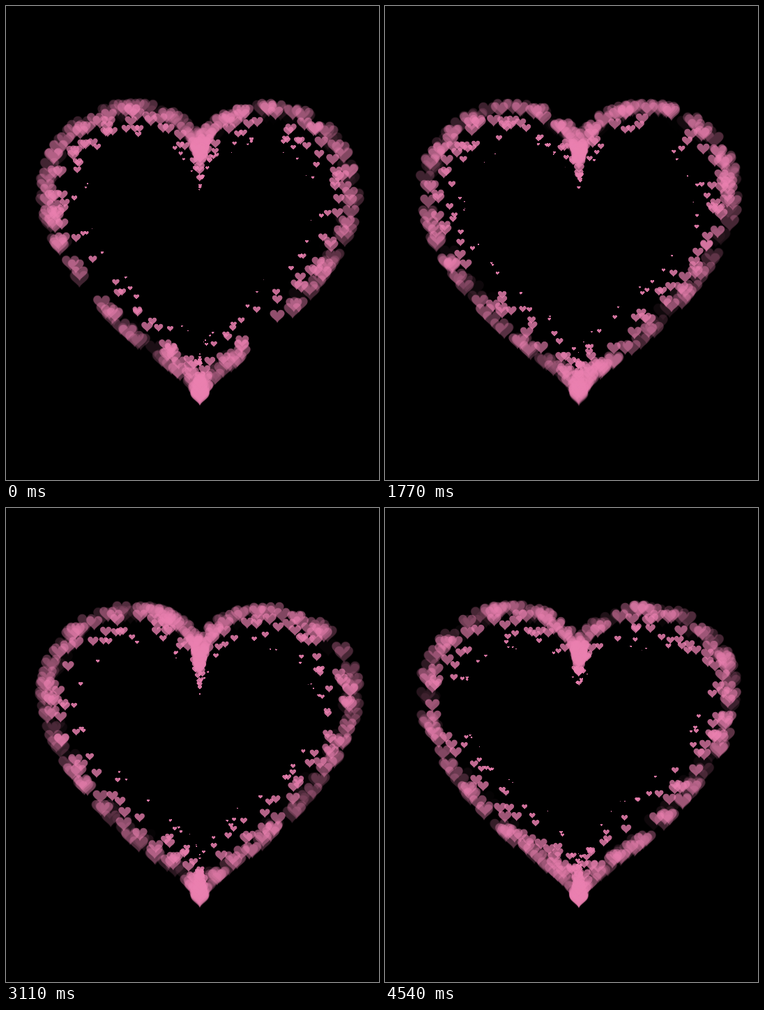
Animation of 535 by 678 pixels, one loop 4.56 s. Source, as an HTML page with a canvas:

```html
<!DOCTYPE html>
<html lang="en">
<head>
<meta charset="utf-8">
<title>Heart of hearts</title>
<style>
html, body { margin: 0; width: 100%; height: 100%; overflow: hidden; background: #000; }
canvas { display: block; }
</style>
</head>
<body>
<canvas id="stage" width="535" height="678"></canvas>
<script>
const LOOP = 4560, LIFE = 2, RATE = 250, SPEED = 100, DRAG = 0.75, SIZE = 30;
const CX = 278, CY = 348.5, TICK = 1 / 60;
const ctx = document.getElementById('stage').getContext('2d');

// Heart curve, y pointing up
const heart = a => ({
  x: 160 * Math.sin(a) ** 3,
  y: 130 * Math.cos(a) - 50 * Math.cos(2 * a) - 20 * Math.cos(3 * a) - 10 * Math.cos(4 * a) + 25
});

function makeSprite() {
  const sprite = document.createElement('canvas');
  sprite.width = sprite.height = SIZE;
  const g = sprite.getContext('2d');
  for (let a = -Math.PI; a < Math.PI; a += 0.01) {
    const p = heart(a);
    g.lineTo(SIZE / 2 + p.x * SIZE / 350, SIZE / 2 - p.y * SIZE / 350);
  }
  g.fillStyle = '#ea80b0';
  g.fill();
  return sprite;
}

function seeded(seed) {
  return () => {
    seed = (seed + 0x6D2B79F5) | 0;
    let n = Math.imul(seed ^ (seed >>> 15), 1 | seed);
    n = (n + Math.imul(n ^ (n >>> 7), 61 | n)) ^ n;
    return ((n ^ (n >>> 14)) >>> 0) / 4294967296;
  };
}

const sprite = makeSprite();
const random = seeded(14);
const particles = Array.from({ length: (LIFE + LOOP / 1000) * RATE }, (_, i) => {
  const p = heart(Math.PI * (1 - 2 * random()));
  const length = Math.hypot(p.x, p.y);
  return { ...p, dx: p.x / length, dy: p.y / length, birth: i / RATE - LIFE };
});

function draw(time) {
  ctx.globalAlpha = 1;
  ctx.fillStyle = '#000';
  ctx.fillRect(0, 0, 535, 678);
  for (const p of particles) {
    const age = time - p.birth;
    if (age <= 0 || age >= LIFE) continue;
    const left = 1 - age / LIFE;
    const size = SIZE * (1 - left ** 3);
    const travel = SPEED * age * (1 - DRAG * (age - TICK) / 2);
    ctx.globalAlpha = left;
    ctx.drawImage(sprite,
      CX + p.x + p.dx * travel - size / 2,
      CY - p.y - p.dy * travel - size / 2, size, size);
  }
}

// The picture holds between steps, slightly longer near the end
const stepAt = ms => ms < 3700 ? Math.floor(ms / 147.5) : 25 + Math.floor((ms - 3700) / 168);
const timeOf = step => (step * 148 + Math.max(0, step - 25) * 20) / 1000;

const start = performance.now();
let shown = -1;
function frame() {
  const step = stepAt((performance.now() - start) % LOOP);
  if (step !== shown) draw(timeOf(shown = step));
  requestAnimationFrame(frame);
}
frame();
</script>
</body>
</html>
```
